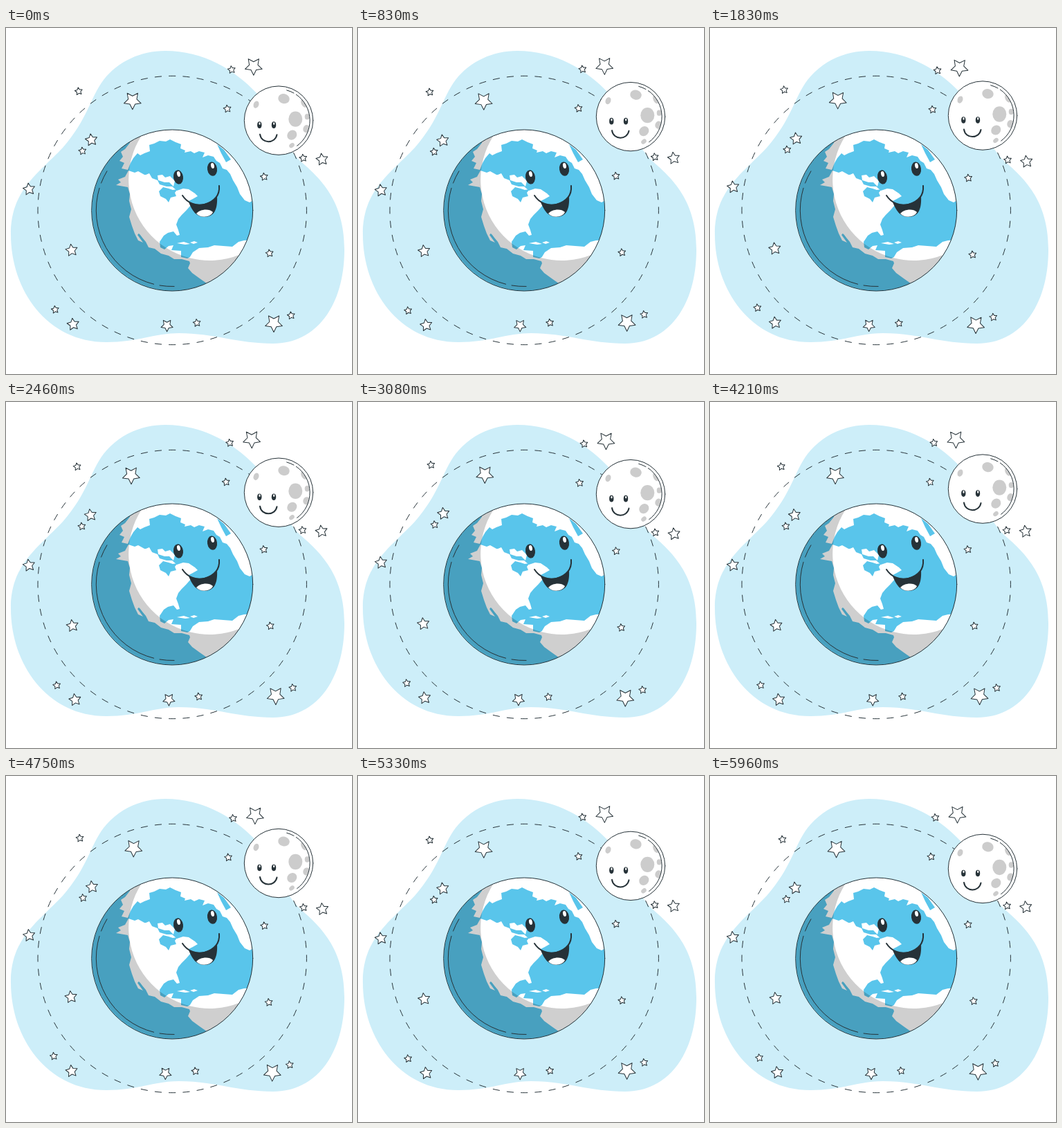
Animation of 500x500 px, one loop 6 s. Source, as an HTML page:

```html
<!DOCTYPE html>
<html lang="en">
<head>
<meta charset="utf-8">
<title>Earth and Moon</title>
<style>
  html, body { margin: 0; width: 100%; height: 100%; overflow: hidden; background: #fff; }
  svg { display: block; width: 100vw; height: 100vh; }
  .line { fill: none; stroke: #263238; stroke-linecap: round; stroke-linejoin: round; }
  .orbit { fill: none; stroke: #263238; }
  .ink { fill: #263238; }
  .white { fill: #fff; }
  .sea { fill: #59c5eb; }
  .crater { fill: #ccc; }
</style>
</head>
<body>
<svg viewBox="0 0 500 500">
  <defs>
    <clipPath id="globe"><circle cx="240.2" cy="263.5" r="116.5"/></clipPath>
    <clipPath id="disc"><circle cx="394" cy="134" r="45"/></clipPath>
  </defs>

  <path fill="#cdeef9" d="M230 33C285 33 330 60 362 94C392 126 397 165 425 192C455 218 489 250 489 320C489 402 448 456 386 456C335 456 300 441 250 441C215 441 190 454 145 454C60 454 7 380 7 298C7 235 45 212 82 173C118 132 122 100 141 75C162 48 195 33 230 33Z"/>
  <circle class="orbit" cx="240.2" cy="263.5" r="194.2" pathLength="120" stroke-dasharray="1" stroke-dashoffset=".5"/>
  <g id="stars" fill="#fff" stroke="#263238" stroke-linejoin="round"></g>

  <g id="earth">
    <g clip-path="url(#globe)">
      <circle class="sea" cx="240.2" cy="263.5" r="117"/>
      <g class="white">
        <!-- polar cap and the eastern edge -->
        <path d="M182 140L179 166L172 175L166 179L169 186L164 192L171 195L167 203L176 205L180 195L184 188L190 181L194 184L200 181L208 178L207 169L214 167L222 163L231 164L237 161L245 165L253 168L252 174L259 177L258 180L267 178L272 181L279 178L287 180L284 187L292 184L300 186L304 192L309 195L313 203L319 205L324 211L328 220L334 230L338 240L345 249L352 252L365 245L365 140Z"/>
        <!-- North America -->
        <path d="M177 206L186 209L191 207L200 212L206 213L211 217L219 220L222 226L232 229L240 229L247 235L256 232L264 233L273 239L277 243L270 247L264 250L267 256L261 263L254 270L249 276L246 284L249 292L251 299L247 300L242 294L234 296L228 300L222 309L223 317L229 320L235 315L242 314L239 321L253 322L253 331L262 333L268 330L265 337L254 334L243 334L235 329L224 326L215 319L206 317L202 309L192 297L190 299L198 310L191 307L186 297L182 286L178 273L181 262L178 250L179 240L176 230L159 227L166 223L162 219L172 215Z"/>
        <!-- South America -->
        <path d="M264 334L270 324L279 318L292 317L301 314L327 316L336 309L344 307L362 306L350 390L288 376L290 369L280 362L269 354L263 347L266 340Z"/>
        <path d="M200 213L207 210L211 217L204 220ZM219 213L226 212L230 216L237 214L244 221L242 229L236 223L229 223L220 220Z"/>
        <path d="M247 311L257 309L266 312L259 313ZM266 310L272 308L277 310L271 312Z"/>
      </g>
      <path class="sea" d="M221 236L227 230L235 232L241 234L248 233L244 238L246 243L238 245L235 252L231 247L223 243ZM305 168L315 176L325 190L318 194L311 181Z"/>
      <path opacity=".19" d="M195.9 155.5A116.5 116.5 0 1 0 337.9 327.5A117 117 0 0 1 195.9 155.5Z"/>
      <path fill="#48a0be" d="M191 297L194 299L201 310L197 308Z"/>
    </g>
    <circle class="line" cx="240.2" cy="263.5" r="116.5"/>
    <path id="earthRim" class="line"/>
    <g class="ink">
      <ellipse cx="249" cy="215.5" rx="7" ry="10.2" transform="rotate(-8 249 215.5)"/>
      <ellipse cx="298" cy="203.7" rx="7" ry="10.2" transform="rotate(-8 298 203.7)"/>
      <path d="M264 252C279 258 297 254 305 243C306 262 301 273 287 273C274 273 269 263 264 252Z"/>
    </g>
    <g class="white">
      <ellipse cx="249.5" cy="211" rx="2.4" ry="4" transform="rotate(-12 249.5 211)"/>
      <ellipse cx="298.5" cy="199" rx="2.4" ry="4" transform="rotate(-12 298.5 199)"/>
      <path d="M275 268C280 262 293 260 299 266C296 274 280 275 275 268Z"/>
    </g>
    <path class="line" stroke-width="2" d="M255 242C262 253 275 258 287 255C303 250 309 240 308 228"/>
  </g>

  <g id="moon">
    <circle class="white" cx="394" cy="134" r="49.7"/>
    <g class="crater" clip-path="url(#disc)">
      <ellipse cx="361.5" cy="111" rx="3.8" ry="5.3" transform="rotate(20 361.5 111)"/>
      <ellipse cx="401.5" cy="102.5" rx="8.3" ry="7" transform="rotate(12 401.5 102.5)"/>
      <ellipse cx="418.3" cy="132" rx="10" ry="11.2"/>
      <ellipse cx="413.3" cy="155" rx="7.5" ry="6.6" transform="rotate(-45 413.3 155)"/>
      <ellipse cx="413" cy="170" rx="4.2" ry="3" transform="rotate(-40 413 170)"/>
      <ellipse cx="435.2" cy="128.5" rx="3.5" ry="4.2"/>
      <ellipse cx="434" cy="146" rx="4.6" ry="5.6" transform="rotate(15 434 146)"/>
      <ellipse cx="430.5" cy="109" rx="3.8" ry="6.5" transform="rotate(-25 430.5 109)"/>
    </g>
    <circle class="line" cx="394" cy="134" r="49.7"/>
    <path id="moonRim" class="line"/>
    <g class="ink">
      <ellipse cx="366.3" cy="140.5" rx="3.2" ry="4.8"/>
      <ellipse cx="387" cy="140.5" rx="3.2" ry="4.8"/>
    </g>
    <g class="white">
      <ellipse cx="366.5" cy="138.4" rx="1.1" ry="1.9"/>
      <ellipse cx="387.2" cy="138.4" rx="1.1" ry="1.9"/>
    </g>
    <path class="line" stroke-width="2" d="M367 154C369 168 389 168 391.5 154.5"/>
  </g>
</svg>
<script>
  const byId = id => document.getElementById(id);
  const TAU = Math.PI * 2;

  function polar(cx, cy, r, degrees) {
    const a = degrees * TAU / 360;
    return `${(cx + r * Math.cos(a)).toFixed(2)} ${(cy + r * Math.sin(a)).toFixed(2)}`;
  }

  function arc(cx, cy, r, from, to) {
    return `M${polar(cx, cy, r, from)}A${r} ${r} 0 0 ${to > from ? 1 : 0} ${polar(cx, cy, r, to)}`;
  }

  function star(cx, cy, r, tilt) {
    const points = Array.from({ length: 10 }, (_, i) =>
      polar(cx, cy, i % 2 ? r * 0.5 : r, tilt - 90 + i * 36));
    return `<path d="M${points.join("L")}Z"/>`;
  }

  const starGroups = [
    { r: 13, tilt: 180, at: [[357.8, 55.3], [182.8, 104.8], [387, 426.5]] },
    { r: 9, tilt: 180, at: [[232.6, 429.8]] },
    { r: 9, tilt: -8, at: [[123.3, 161.8], [456.7, 190], [33.3, 233], [94.8, 321.2], [97, 428.3]] },
    { r: 5.7, tilt: -8, at: [[105, 91.5], [326, 60.3], [319.8, 116.8], [110.5, 177.8], [429.4, 188],
      [373, 215], [412, 415.5], [275.8, 426.2], [380.8, 325.6], [71, 407]] }
  ];
  byId("stars").innerHTML = starGroups
    .flatMap(({ r, tilt, at }) => at.map(([x, y]) => star(x, y, r, tilt))).join("");

  byId("earthRim").setAttribute("d",
    [[211, 201], [197, 104], [99.5, 88.5]].map(([a, b]) => arc(240.2, 263.5, 110, a, b)).join(""));
  byId("moonRim").setAttribute("d",
    [[-75, -61], [-56, 54]].map(([a, b]) => arc(394, 134, 45.3, a, b)).join(""));

  const LEAD = 50;
  const REST_ANGLE = LEAD / 375;

  // Linear swing 0 → 1 → -1 → 0
  function swing(t, period) {
    const p = (t / period) % 1;
    return p < 0.25 ? p * 4 : p < 0.75 ? 2 - p * 4 : p * 4 - 4;
  }

  // Linear rise and fall 0 → 1 → 0
  function bounce(t, period) {
    return 1 - Math.abs(1 - 2 * ((t / period) % 1));
  }

  function draw(ms) {
    const t = ms + LEAD;
    byId("stars").setAttribute("transform", `rotate(${swing(t, 1500) - REST_ANGLE} 245 241)`);
    byId("moon").setAttribute("transform", `translate(0 ${-10 * bounce(t, 3000)})`);
  }

  const start = performance.now();
  function tick() {
    draw((performance.now() - start) % 6000);
    requestAnimationFrame(tick);
  }
  draw(0);
  requestAnimationFrame(tick);
</script>
</body>
</html>
```
